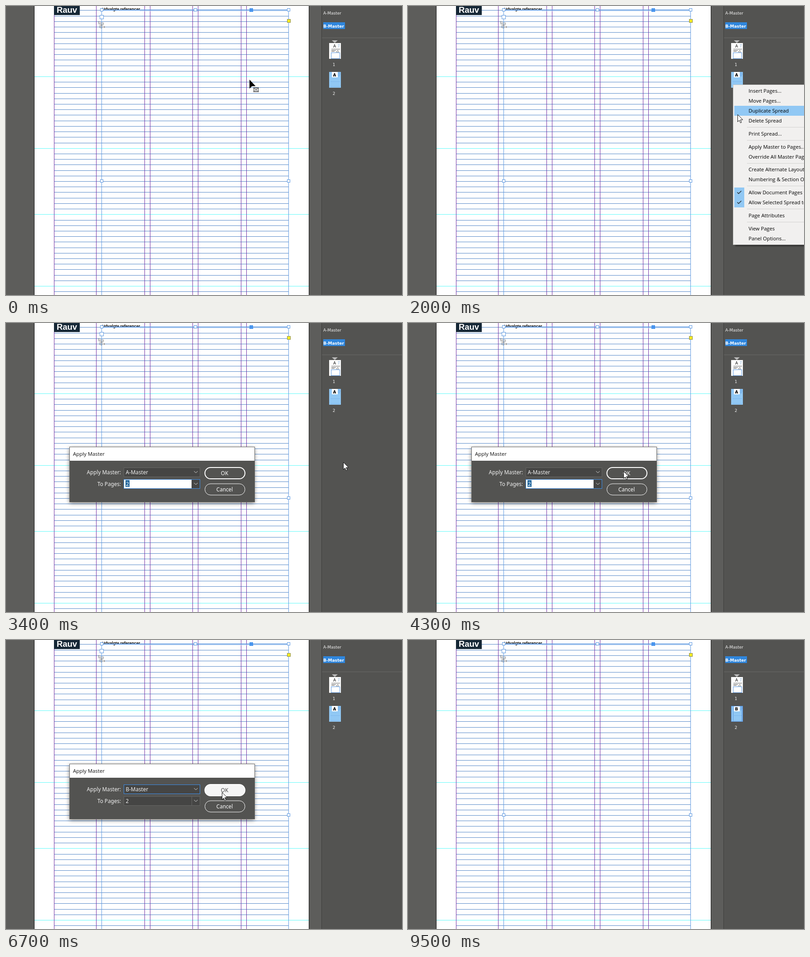
Recreate the animation shown at these times as an HTML page. Size 875x640 px, loop 9700 ms.

```html
<!DOCTYPE html>
<html lang="en">
<head>
<meta charset="utf-8">
<title>Apply a master page</title>
<style>
html, body { margin: 0; width: 100%; height: 100%; overflow: hidden; background: #5d5d5b; }
svg { display: block; }
text { white-space: pre; }
.panel { font: 9px "DejaVu Sans", sans-serif; }
.menu { font: 11.2px "Open Sans", sans-serif; }
.dialog { font: 11.7px "Noto Sans", sans-serif; }
.page { font: bold 9px "Liberation Sans", sans-serif; }
</style>
</head>
<body>
<svg width="875" height="640" viewBox="0 0 875 640">
  <g id="base"></g>
  <g id="live"></g>
</svg>
<script>
const LOOP = 9700, STEP = 100;
const GRID = '#5588c8', BLUE = '#5b97e0', PALE = '#91c8f4', DARK = '#535351';

const rect = (x, y, w, h, fill, more = '') =>
  `<rect x="${x}" y="${y}" width="${w}" height="${h}" fill="${fill}" ${more}/>`;
const box = (x, y, w, h, fill, stroke, more = '') =>
  rect(x + .5, y + .5, w - 1, h - 1, fill, `stroke="${stroke}" ${more}`);
const path = (d, fill, stroke = 'none', more = '') =>
  `<path d="${d}" fill="${fill}" stroke="${stroke}" ${more}/>`;
const text = (x, y, s, fill, more = '') =>
  `<text x="${x}" y="${y}" fill="${fill}" ${more}>${s}</text>`;
const group = (inner, more) => `<g ${more}>${inner}</g>`;
const MIDDLE = 'text-anchor="middle" ', END = 'text-anchor="end" ', BOLD = 'font-weight="bold" ';

function page() {
  let s = rect(62, 0, 608, 640, '#111') + rect(63, 0, 606, 640, '#fff');
  for (let k = -12; k < 40; k++)
    s += rect(106, Math.floor(156.52 + 12.211 * k), 519, 1, GRID);
  for (const y of [156, 315, 461, 620]) s += rect(63, y, 606, 1, '#5ffafa');
  for (const x of [106, 199, 306, 318, 412, 424, 519, 531])
    s += rect(x, 0, 1, 640, '#702ca2');

  s += rect(106, 0, 57, 20, '#152736');
  s += text(134.5, 15, 'Rauv', '#fff', MIDDLE + 'style="font:bold 18.5px \'Liberation Sans\',sans-serif"');
  s += text(212, 10, 'Udvalgte referencer', '#000', 'class="page"');

  // selected text frame with its handles
  s += rect(211, 8, 1, 632, BLUE) + rect(624, 8, 1, 632, BLUE) + rect(211, 8, 414, 2, BLUE);
  s += path('M297 11.5H624', 'none', BLUE, 'stroke-dasharray="1 2"');
  for (const [x, y] of [[211, 8], [418, 8], [624, 8], [211, 387], [624, 387]])
    s += box(x - 3, y - 3, 7, 7, '#fff', BLUE);
  s += box(207, 20, 9, 9, '#fff', BLUE);
  s += rect(538, 5, 8, 8, '#4a96ee');
  s += box(621, 29, 8, 8, '#f5ec27', '#8a8a50');

  // loaded text icon
  s += path('M204.5 40V34.5H209M206.5 37.5H215.5V42M207.5 38V48.5H213', 'none', '#555', 'stroke-dasharray="2 1"');
  s += path('M209 40.5h5M209 42.5h5M209 44.5h4M212 46.5h6M216 44l2.5 2.5-2.5 2.5', 'none', '#777');
  return s;
}

function panel() {
  let s = rect(697, 0, 1, 640, '#3d3d3c') + rect(698, 0, 177, 640, DARK);
  s += rect(698, 70, 177, 1, '#686866');
  s += text(701, 18.5, 'A-Master', '#f2f2f2');
  s += rect(701, 36, 48, 15, '#2f86dd') + text(701, 47.5, 'B-Master', '#fff', BOLD);
  s += path('M720 76H733L726.5 82Z', '#b9b9b9');

  s += rect(714, 82, 26, 35, '#fff') + text(726, 92, 'A', '#000', MIDDLE);
  s += path('M733 85.5h5M734 88.5h3M734 91h2', 'none', '#8fb4d8');
  s += path('M719 95.5h19M719 98.5h10M719 100.5h7M731 98.5h4M729 101.5h7', 'none', '#666');
  s += box(718, 103, 20, 14, '#fff', BLUE);
  s += text(724.5, 133, '1', '#f2f2f2', MIDDLE) + text(724.5, 197, '2', '#f2f2f2', MIDDLE);
  return group(s, 'class="panel"');
}

function thumb(letter) {
  let s = rect(714, 146, 26, 35, PALE) + rect(720, 146, 13, 12, '#fff');
  s += text(726, 155.5, letter, '#000', MIDDLE + BOLD);
  s += path('M734 148.5h5M734 151.5h5M734 154.5h4', 'none', BLUE);
  s += path('M718 167.5h20M718 178.5h20', 'none', BLUE, 'stroke-dasharray="1 2"');
  if (letter === 'B') s += box(714, 146, 26, 35, 'none', BLUE) + path('M718.5 146v35M737.5 146v35', 'none', BLUE);
  return group(s, 'class="panel"');
}

const ITEMS = [
  [188, 'Insert Pages...'], [210, 'Move Pages...'], [232, 'Duplicate Spread'], [254, 'Delete Spread'],
  [283, 'Print Spread...'], [312, 'Apply Master to Pages...'], [334, 'Override All Master Page Items'],
  [362, 'Create Alternate Layout...'], [384, 'Numbering &amp; Section Options...'],
  [413, 'Allow Document Pages to Shuffle'], [435, 'Allow Selected Spread to Shuffle'],
  [464, 'Page Attributes'], [493, 'View Pages'], [515, 'Panel Options...']
];

function menu(hoverY, opacity) {
  let s = rect(723, 180, 160, 352, '#000', 'opacity=".4" filter="url(#tight)"');
  s += box(718, 174, 170, 355, '#f1f0ef', '#c4c4c2');
  for (const y of [268, 297, 348, 398, 449, 478]) s += rect(749, y, 126, 1, '#d2d2d0');
  for (const [y, label] of ITEMS) {
    if (Math.abs(hoverY - y) < 11) s += rect(721, y - 11, 154, 22, PALE);
    if (y === 413 || y === 435)
      s += rect(721, y - 11, 22, 22, PALE) + path(`M727.5 ${y - .5}l3 3 6-6`, 'none', '#222', 'stroke-width="1.3"');
    s += text(752.5, y + 4, label, '#000');
  }
  return group(s, `class="menu" opacity="${opacity}"`);
}

const chevron = (x, y) => path(`M${x - 4} ${y - 2}l4 4 4-4`, 'none', '#ddd');

function button(y, label, weight, fill = 'none') {
  return rect(439.5, y, 88.5, 25, fill, `rx="12.5" stroke="#fff" stroke-width="${weight}"`) +
    text(483, y + 16.5, label, fill === 'none' ? '#fff' : '#444', MIDDLE);
}

function dialog(t, y, opacity) {
  const open = t >= 4700 && t < 6000, picked = t >= 6000;
  let s = rect(140, 277, 409, 122, '#000', `opacity="${open ? .35 : .5}" filter="url(#soft)"`);
  s += box(140, 274, 410, 123, DARK, '#676765') + rect(141, 275, 408, 30, '#fff');
  s += text(148, 294, 'Apply Master', open ? '#999' : '#111', 'style="font:11.4px \'Open Sans\',sans-serif"');
  s += text(254, 335, 'Apply Master:', '#f2f2f2', END) + text(254, 361, 'To Pages:', '#f2f2f2', END);

  const focus = picked && t < 7200;
  s += box(260, 320, 169, 21, open ? '#2f2f2e' : '#454544', focus ? '#3d8ee8' : '#666664');
  s += text(264.5, 335, picked ? 'B-Master' : 'A-Master', '#f2f2f2') + chevron(419.5, 330);

  if (picked) {
    s += box(260, 346, 169, 21, '#454544', '#666664') + rect(410, 347, 1, 19, '#666664');
    s += text(264.5, 361, '2', '#f2f2f2');
  } else {
    s += box(260, 346, 169, 21, '#454544', '#3d8ee8') + rect(261, 347, 149, 19, '#fff');
    s += rect(264, 348, 9, 15, '#24699f') + text(265, 360.5, '2', '#fff');
  }
  s += chevron(419.5, 356);
  s += button(320, 'OK', 2, t >= 7200 ? '#d5d5d5' : t >= 6700 ? '#f5f5f5' : 'none') + button(356, 'Cancel', 1);

  if (open) {
    s += rect(264, 344, 167, 61, '#000', 'opacity=".5" filter="url(#tight)"') + rect(260, 341, 169, 62, '#484847');
    const row = Math.max(0, Math.min(2, Math.floor((y - 341) / 21)));
    if (t >= 5100) s += rect(260, 341 + 21 * row, 169, row < 2 ? 21 : 20, '#595958');
    ['[None]', 'A-Master', 'B-Master'].forEach((label, i) =>
      s += text(282.5, 356 + 21 * i, label, i === 1 ? '#4b9df2' : '#f2f2f2'));
    s += path('M265.5 372l3 3.5 6-6.5', 'none', '#ddd', 'stroke-width="1.8"');
  }
  return group(s, `class="dialog" opacity="${opacity}"`);
}

// pointer stops: time, x, y
const STOPS = [
  [0, 538, 163], [200, 538, 163], [500, 743, 173], [600, 743, 173], [800, 718, 175],
  [1200, 718, 175], [1700, 724, 226], [1800, 724, 226], [2500, 743, 299], [2600, 743, 299],
  [2800, 745, 308], [3400, 745, 308], [3900, 547, 322], [4700, 404, 334], [5000, 404, 334],
  [5100, 402, 338], [5800, 383, 387], [6200, 383, 387], [6800, 484, 333], [8200, 484, 333],
  [8700, 284, 108], [8800, 284, 108], [9500, 130, -32], [LOOP, 130, -32]
];

function pointerAt(t) {
  const i = STOPS.findIndex(k => k[0] > t);
  const [t0, x0, y0] = STOPS[i - 1], [t1, x1, y1] = STOPS[i];
  const u = (t - t0) / (t1 - t0), e = u * u * (3 - 2 * u);
  return [Math.round(x0 + (x1 - x0) * e), Math.round(y0 + (y1 - y0) * e)];
}

function pointer(x, y, tool) {
  const s = tool
    ? path('M0 0V20L5.5 14.5H13.5Z', '#000') +
      path('M9 18.5h11M9 26.5h11', 'none', '#000', 'stroke-width="2" stroke-dasharray="2 1"') +
      path('M10 20v6M19 20v6', 'none', '#000', 'stroke-width="2" stroke-dasharray="1 1"') +
      path('M13 22.5h3M14.5 21v3', 'none', '#000')
    : path('M.5 .5V16.5L4 13L6.6 18.8L9 17.7L6.5 12H11.8Z', '#fff', '#111');
  return group(s, `transform="translate(${x} ${y})"`);
}

function scene(t) {
  const [x, y] = pointerAt(t);
  let s = thumb(t < 7600 ? 'A' : 'B');
  if (t >= 1000 && t < 3100) s += menu(t < 1300 ? 0 : y + 1, t < 1100 ? .6 : 1);
  if (t >= 3200 && t < 7500) s += dialog(t, y, t < 3300 ? .4 : t < 7400 ? 1 : .4);
  return s + pointer(x, y, t < 500 && x < 669 || t >= 7700);
}

document.getElementById('base').innerHTML =
  `<defs><filter id="soft" x="-20%" y="-20%" width="140%" height="140%"><feGaussianBlur stdDeviation="5"/></filter>
   <filter id="tight"><feGaussianBlur stdDeviation="1.5"/></filter></defs>` + page() + panel();

const live = document.getElementById('live'), start = performance.now();
let shown = -1;
function frame() {
  const t = Math.floor((performance.now() - start) % LOOP / STEP) * STEP;
  if (t !== shown) live.innerHTML = scene(shown = t);
  requestAnimationFrame(frame);
}
frame();
</script>
</body>
</html>
```
